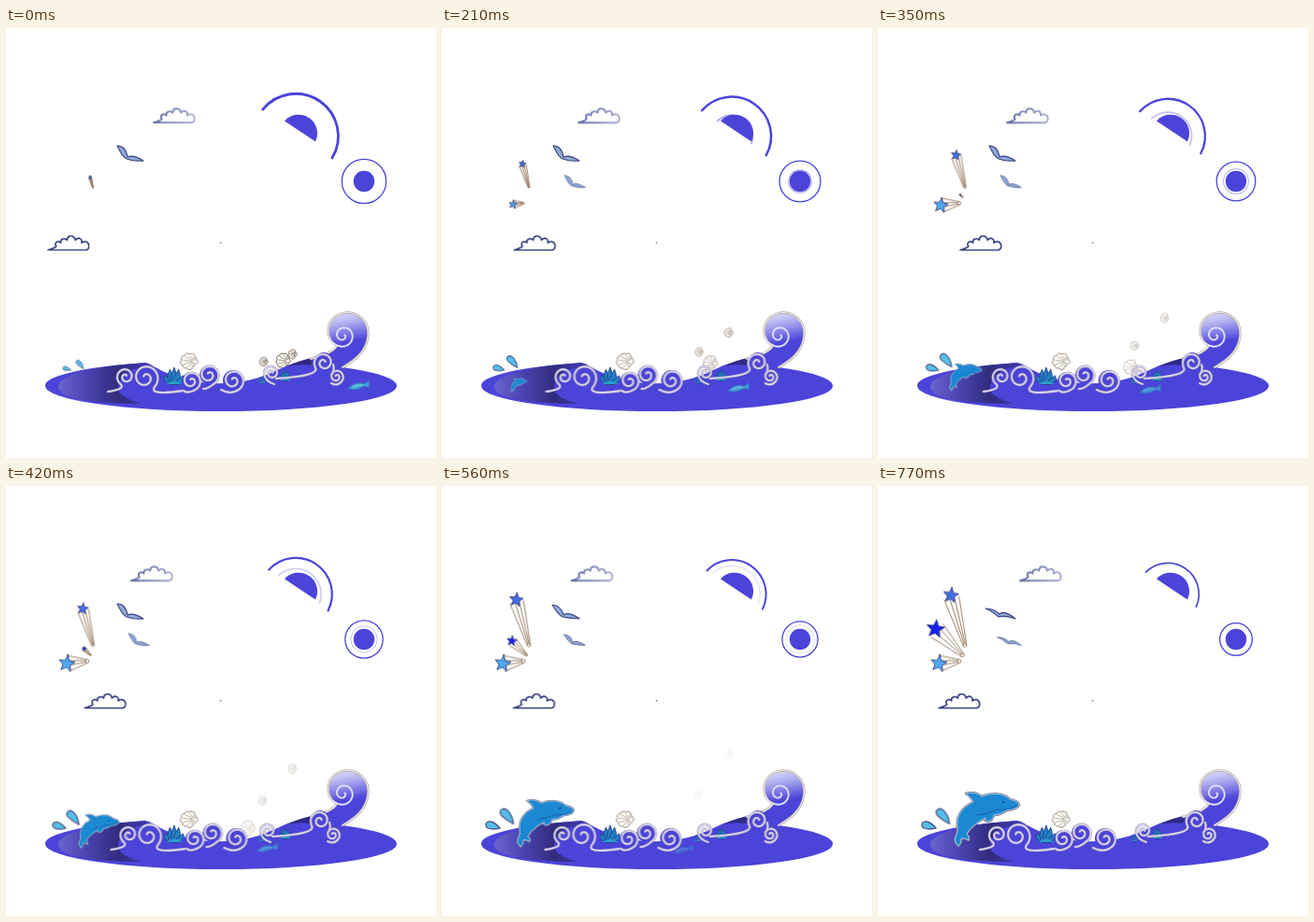
Recreate the animation shown at these times as an HTML page. Size 460 by 460 pixels, loop 0.84 s.

```html
<!DOCTYPE html>
<html lang="en">
<head>
<meta charset="utf-8">
<title>Sea scene</title>
<style>
html, body { margin: 0; width: 100%; height: 100%; overflow: hidden; background: #fff; }
svg { display: block; width: 460px; height: 460px; }
path, circle { stroke-linecap: round; stroke-linejoin: round; }
.thin * { vector-effect: non-scaling-stroke; }
</style>
</head>
<body>
<svg id="stage" viewBox="0 0 460 460">
  <defs>
    <linearGradient id="shade">
      <stop offset="0" stop-color="#6a64cc"/>
      <stop offset=".3" stop-color="#4a43b0"/>
      <stop offset=".62" stop-color="#322c7c"/>
      <stop offset="1" stop-color="#443dc2"/>
    </linearGradient>
    <linearGradient id="crest" x1=".4" y1="0" x2=".6" y2="1">
      <stop offset="0" stop-color="#e2e2fc"/>
      <stop offset=".22" stop-color="#aeadf0"/>
      <stop offset=".55" stop-color="#4b44d9"/>
    </linearGradient>
    <linearGradient id="mist">
      <stop offset="0" stop-color="#5c669f"/>
      <stop offset="1" stop-color="#a3a9cb"/>
    </linearGradient>
  </defs>
</svg>
<script>
const STEP = 70, COUNT = 12, BLUE = '#4b44d9';
const stage = document.getElementById('stage');

function add(tag, attrs = {}, parent = stage) {
  const el = document.createElementNS('http://www.w3.org/2000/svg', tag);
  for (const name in attrs) el.setAttribute(name, attrs[name]);
  return parent.appendChild(el);
}
const shape = (d, fill, stroke = 'none', width = 1, parent = stage) =>
  add('path', { d, fill, stroke, 'stroke-width': width }, parent);

// Progress from 0 to 1 between steps a and b
const ramp = (k, a, b) => Math.min(1, Math.max(0, (k - a) / (b - a)));
// Out and back over the given number of steps
const sway = (k, span) => Math.sin(Math.PI * ramp(k, 0, span)) ** 2;

// Held poses, one per step
function play(el, pose) {
  const frames = [];
  for (let k = 0; k <= COUNT; k++)
    frames.push({ offset: k / COUNT, easing: 'steps(1, end)', ...pose(Math.min(k, COUNT - 1)) });
  el.animate(frames, { duration: STEP * COUNT, iterations: Infinity });
}
const place = (x, y, s = 1) => `translate(${x}px, ${y}px) scale(${s})`;
function polar(cx, cy, r, deg) {
  const a = deg * Math.PI / 180;
  return (cx + r * Math.cos(a)).toFixed(2) + ' ' + (cy + r * Math.sin(a)).toFixed(2);
}
// A lead-in from (x, y) that meets a shrinking spiral along its tangent
function curl(x, y, cx, cy, r, from, dir = -1, turns = 1.5) {
  const n = 44, a = from * Math.PI / 180, pts = [];
  const qx = cx + r * (Math.cos(a) + dir * Math.sin(a));
  const qy = cy + r * (Math.sin(a) - dir * Math.cos(a));
  for (let i = 0; i <= n; i++)
    pts.push(polar(cx, cy, r * (1 - .84 * (i / n) ** 1.15), from + dir * turns * 360 * i / n));
  return `M${x} ${y} Q${qx} ${qy} ${pts.join(' L')}`;
}

// Suns
const arc = (r, a, b) =>
  `M${polar(310, 115.7, r, a)} A${r} ${r} 0 0 1 ${polar(310, 115.7, r, b)}`;
const ringFade = k => k > 1 ? .8 * (1 - ramp(k, 2, 10)) : 0;
play(shape('', 'none', BLUE, 3), k => ({
  d: `path("${arc(45.4 - 1.1 * k, 219 + k * .55, 391 - k * .64)}")`,
  strokeWidth: 2.8 - k * .1 + 'px'
}));
play(shape('', 'none', '#827dde', 1.6), k => ({
  d: `path("${arc(17.6 + 1.6 * k, 228, 381)}")`,
  opacity: ringFade(k)
}));
shape('M298 99.5 A20 20 0 0 1 331 121.5Z', BLUE);

const ring = (stroke, width) =>
  add('circle', { cx: 383, cy: 164, fill: 'none', stroke, 'stroke-width': width });
play(ring(BLUE, 1.3), k => ({ r: 23.7 - .58 * k + 'px' }));
play(ring('#827dde', 1.2), k => ({ r: 10.4 + .6 * k + 'px', opacity: ringFade(k) }));
add('circle', { cx: 383, cy: 164, r: 11.2, fill: BLUE });
add('circle', { cx: 229.5, cy: 229.7, r: .9, fill: '#8a8a8a' });

// Clouds
function cloud(stroke, width, y, x) {
  const d = 'M0 16 Q7 14 9 12 C6 8 11 5 14 8 C13 4 18 2 21 5 ' +
            'C21 -1 29 -1 30 5 C34 1 38 4 37 8 C43 4 47 10 44 15 L42 16Z';
  play(shape(d, '#fff', stroke, width), k => ({ transform: place(x(k), y, .97) }));
}
cloud('url(#mist)', 1.9, 85.7, k => 158 - 24 * ramp(k, 0, 6) + 18 * ramp(k, 7, 11));
cloud('#343d80', 1.7, 222, k => 45 + 43 * ramp(k, 0, 4) - 23 * ramp(k, 5, 11));

// Birds spread their wings near the end of the loop
function wings(k) {
  const u = ramp(k, 7, 11), x = 119 - 4 * u, y = 126 + 5 * u;
  return `path("M${x} ${y} Q${x + 9} ${y} 130 ${138 - u} Q${136 - u} ${135 - 3 * u} 147 142 ` +
         `Q${137} ${143 - 5 * u} 129 140 Q${x + 6} ${139 - 6 * u} ${x} ${y}Z")`;
}
function bird(stroke, attrs) {
  const g = add('g', attrs);
  play(shape('', '#8fa9d6', stroke, 1.1, g), k => ({ d: wings(k) }));
  return g;
}
bird('#39427f');
play(bird('#5a669a', { transform: 'translate(38.5 59.7) scale(.78)' }),
  k => ({ opacity: k ? 1 : 0 }));

// Shooting stars grow out of the end of their trails
function shootingStar(x, y, dx, dy, r, fill, size) {
  const g = add('g', { class: 'thin' });
  const len = Math.hypot(dx, dy), nx = -dy / len, ny = dx / len;
  const line = w => `M${dx * .94 + nx * w * r} ${dy * .94 + ny * w * r} L${nx * w * 2} ${ny * w * 2}`;
  for (const w of [-.95, -.25, .35, .95]) shape(line(w), 'none', '#8a6a4b', .85, g);
  add('circle', { r: 1.8, fill: '#fff', stroke: '#8a6a4b', 'stroke-width': .7 }, g);
  const pts = [];
  for (let i = 0; i < 10; i++) pts.push(polar(dx, dy, i % 2 ? r * .45 : r, i * 36 - 82));
  shape('M' + pts.join(' L') + 'Z', fill, '#3a4278', .9, g);
  play(g, k => ({ transform: place(x, y, size(k)) }));
}
shootingStar(93, 170.5, -15, -53.5, 8.5, '#426fe8', k => .2 + .8 * ramp(k, 0, 9));
shootingStar(90.5, 181, -29, -28, 10, '#1722ee', k => ramp(k, 4.4, 11));
shootingStar(87, 187.5, -22, 2.5, 9, '#4ea8f6', k => ramp(k, .5, 5.5));

// Shells: scalloped fan with ribs from the hinge
function shell(r, stroke = '#75604f') {
  const g = add('g'), hinge = `${r} ${r * .1}`;
  let rim = `M${hinge}`, ribs = '';
  for (let i = 0; i <= 6; i++) {
    const p = polar(0, 0, r, 70 + i * 40);
    rim += i ? ` A${r * .37} ${r * .37} 0 0 1 ${p}` : ` L${p}`;
    ribs += `M${polar(r * .5, 0, r * .2, 70 + i * 40)} L${polar(0, 0, r * .8, 70 + i * 40)} `;
  }
  shape(rim + 'Z', '#fffdf9', stroke, r > 6 ? 1 : .8, g);
  shape(ribs, 'none', stroke, .65, g);
  return g;
}
const floatShell = (r, x, y) => play(shell(r), k => ({
  transform: place(x(k), y(k)), opacity: 1 - ramp(k, 0, 9)
}));
shell(8.6, '#8c7867').setAttribute('transform', 'translate(196.5 356.5) scale(1 .88)');
floatShell(4.2, k => 276 - k * .2, k => 357 - 3.4 * k);
floatShell(4.4, k => 307, k => 349 - 7.7 * k);
floatShell(7, k => 297 - 1.05 * k * k, k => 356 + .28 * k * k);

// Sea
shape('M150 358 L160 363 C185 377 215 383 245 379 C270 377 285 368 301 361 L326 353 L360 363 ' +
      'A188 27 0 0 1 418 383 A188 27 0 0 1 42 383 A188 27 0 0 1 150 358Z', BLUE);
shape('M56 383 C58 370 100 361 150 358 L160 363 C136 361 123 369 120 384 C119 393 131 397 145 402 ' +
      'C94 402 54 396 56 383Z', 'url(#shade)');
shape('M301 362 Q314 355 330 353 L326 361 Q314 359 301 362Z', '#302a86');
shape('M150 358 Q155 358 159 363', 'none', '#b8b3c6', 1);

// Big breaker
const breaker = 'C340 350 350 347 354 340 C345 335 343 325 346 317 C350 307 361 303 370 305 ' +
                'C382 308 389 318 387 331 C385 346 374 355 360 363';
shape(`M326 354 ${breaker} L334 366Z`, 'url(#crest)');
shape(`M326 354 ${breaker}`, 'none', '#a89d95', 2.4);
shape(`M326 354 ${breaker}`, 'none', '#f6f5fb', 1.1);
shape(curl(347, 333, 360.5, 329, 12, 110, -1, 1.35), 'none', '#dfdef9', 1.9);

// Weeds
function weed(x, y, s, opacity = 1) {
  const g = add('g', { transform: `translate(${x} ${y}) scale(${s})`, opacity });
  for (let i = -2; i <= 2; i++) {
    const h = 18 - 2.2 * i * i, tip = i * 4.6;
    shape(`M-4 0 Q${tip - 5} ${-h * .4} ${tip} ${-h} Q${tip + 4} ${-h * .4} 4 0Z`,
      '#2180c2', '#28428b', .9, g);
  }
  shape('M-9 0 Q0 -7 9 0Z', '#2b9dcc', 'none', 0, g);
}
weed(180, 381, 1);
weed(299, 377, .62);
weed(274, 380, .45, .6);

// Fish
const fish = add('g');
shape('M-11 2 Q-3 -5 7 -1 L12 -4 L11 3 L6 1 Q-3 6 -11 2Z', '#3ca9d6', '#327fb5', .7, fish);
shape('M-6 1 Q0 -2 5 0', 'none', '#9bdcea', .9, fish);
play(fish, k => ({
  transform: place(377 - 130 * (k / 9) ** .7, 382.5 + k * .8) + ' rotate(-6deg)',
  opacity: 1 - ramp(k, 0, 10) ** 2
}));

// Drops
function drop(x, y, dx, dy, d) {
  const g = add('g');
  shape(d, '#55bfe8', '#4d5788', 1.3, g);
  play(g, k => {
    const u = ramp(k, 0, 8);
    return { transform: place(x + dx * u, y + dy * u, .57 + .43 * u ** .7) };
  });
}
drop(69.5, 366, -7.5, 0, 'M0 0 Q-8 2 -13 0 C-17 -3 -15 -8 -10 -7 Q-5 -6 0 0Z');
drop(83, 364.5, -6.5, -3, 'M0 0 Q-8 -4 -13 -9 C-17 -14 -11 -19 -6 -14 Q-1 -9 0 0Z');

// Dolphin grows from its tail
const dolphin = add('g'), body = add('g', { transform: 'translate(-85 -385)' }, dolphin);
const outline = 'M86 385 Q81 381 83 375 Q86 370 85 365 C83 353 91 343 102 338 Q99 332 94 329 ' +
  'Q103 326 111 332 C122 328 134 328 141 335 Q150 337 151 341 Q149 346 138 347 Q131 352 124 352 ' +
  'Q123 358 117 359 Q113 358 115 355 C108 358 99 365 95 372 Q98 375 97 379 Q92 376 89 377 Q90 382 86 385Z';
shape(outline, '#fff', '#72708f', 2.4, body);
shape(outline, '#1b88d2', '#dfe6f3', .7, body);
shape('M107 352 Q120 350 128 346 Q137 348 149 342', 'none', '#1c5c9d', .9, body);
add('circle', { cx: 134, cy: 338, r: 1.1, fill: '#173c73' }, body);
play(dolphin, k => {
  const u = ramp(k, 1, 9);
  return { transform: place(71 + 14 * u, 390.5 - 5.5 * u, u) };
});

// Curling foam
function foam(discs, lines, shift) {
  const g = add('g');
  for (const [cx, cy, r] of discs) add('circle', { cx, cy, r, fill: BLUE }, g);
  for (const d of lines) {
    shape(d, 'none', '#988d9b', 2.6, g);
    shape(d, 'none', '#d6d2f1', 1.8, g);
  }
  play(g, k => ({ transform: place(shift(k), 0) }));
}
foam([[198, 378, 10], [217, 371, 10], [243, 377, 11]], [
  curl(109, 389, 128, 373, 9.5, 130, 1),
  curl(189, 388, 149, 374, 14, 40),
  curl(190, 388, 198, 377.5, 10.5, 60),
  curl(211, 386, 217, 371, 11, 50),
  curl(230, 387, 243, 377, 11.5, 50)
], k => 3.8 * sway(k, 10));
foam([[340, 357, 10]], [
  curl(287, 381, 284, 369, 8, 170, 1),
  curl(289, 375, 340, 358, 10.5, 150, 1),
  curl(348, 380, 353.5, 373, 7.5, 40),
  'M350 360 Q352 366 348 371'
], k => -4 * sway(k, 11));
</script>
</body>
</html>
```
